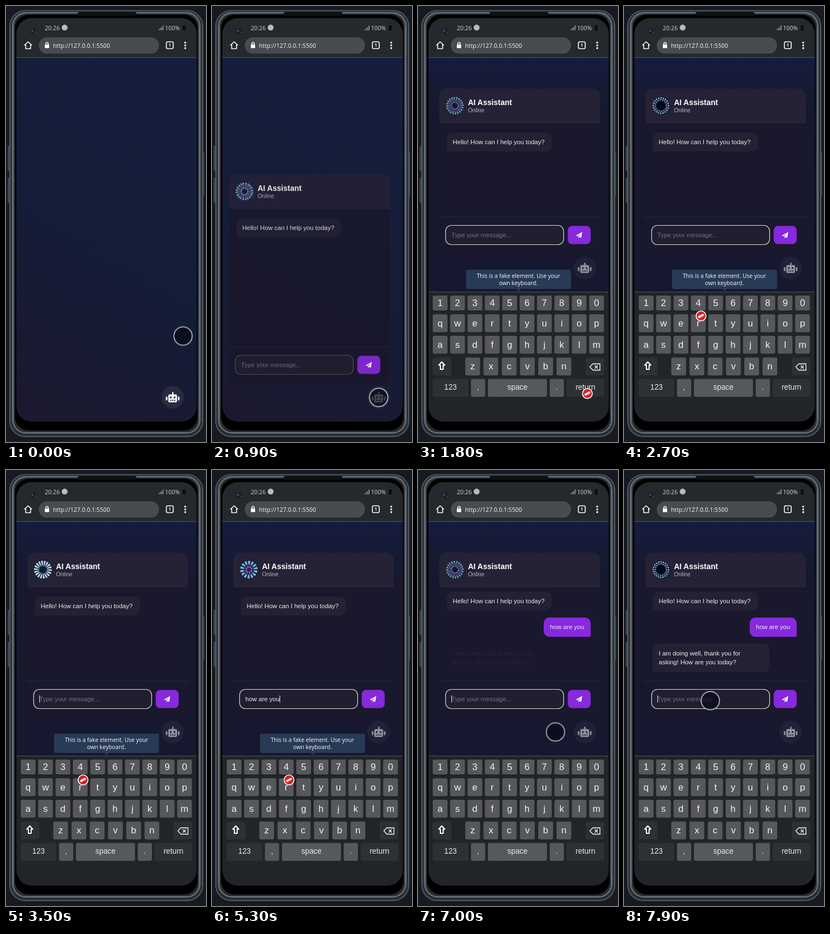
An HTML page for the animation above (8000 ms loop, 366x792 px).

```html
<!DOCTYPE html>
<html lang="en">
<head>
<meta charset="utf-8">
<title>AI Assistant chat</title>
<style>
html, body { margin: 0; width: 100%; height: 100%; overflow: hidden; background: #171a20; }
svg { display: block; width: 366px; height: 792px; }
text { font-family: "Liberation Sans", Arial, sans-serif; font-size: 11.5px; fill: #ececf0; white-space: pre; }
.ui { font-family: "Noto Sans", "Open Sans", sans-serif; font-size: 10.7px; }
.mid { text-anchor: middle; }
.tip-text { font-size: 10.3px; }
.key { font-size: 17px; fill: #f4f4f4; }
.word { font-size: 13.8px; }
.line { fill: none; stroke: #fff; stroke-width: 1.6; }

/* 1% of the loop is 80 ms */
.anim { animation: 8s linear infinite; }
.jump { animation-timing-function: step-end; }

.cursor { animation-name: move; animation-timing-function: ease-in-out; }
@keyframes move {
  0%, 2% { transform: translate(324px, 599.5px); }
  8.5%, 12.4% { transform: translate(305px, 711px); }
  14%, 24% { transform: translate(310px, 704px); }
  31%, 68% { transform: translate(141px, 563px); }
  73%, 76% { transform: translate(297px, 416px); }
  80%, 81.5% { transform: translate(305px, 447px); }
  90% { transform: translate(240px, 482px); }
  97%, 100% { transform: translate(158px, 419px); }
}
.touch { animation-name: touch; }
@keyframes touch {
  0%, 69.5%, 87.5%, 100% { visibility: visible; }
  12.5%, 78% { visibility: hidden; }
}
.forbid { animation-name: forbid; }
@keyframes forbid {
  0%, 69.5%, 100% { visibility: hidden; }
  12.5% { visibility: visible; }
}
.arrow { animation-name: arrow; }
@keyframes arrow {
  0%, 87.5%, 100% { visibility: hidden; }
  78% { visibility: visible; }
}
.keyboard { animation-name: keyboard; }
@keyframes keyboard {
  0% { visibility: hidden; }
  12.5%, 100% { visibility: visible; }
}
.bot { animation-name: bot; }
@keyframes bot {
  0% { transform: none; opacity: 1; }
  12.5%, 100% { transform: translateY(-235px); opacity: .55; }
}
.chat { animation-name: chat; }
@keyframes chat {
  0%, 8.8% { opacity: 0; transform: translate(-8px, 254px); }
  11.5% { opacity: 1; transform: translate(-8px, 234px); }
  12.49% { transform: translate(-8px, 234px); }
  12.5%, 16.4% { transform: translate(-8px, 0); }
  18.5%, 100% { opacity: 1; transform: none; }
}
.top { animation-name: top; }
@keyframes top {
  0%, 16.4% { transform: translateY(-80px); }
  18.5%, 100% { transform: none; }
}
.input { animation-name: focus; }
@keyframes focus {
  0%, 12.5% { stroke: #55535f; }
  20%, 100% { stroke: #dcdce2; }
}
.log { animation-name: log; }
@keyframes log {
  0% { transform: none; }
  87.5%, 100% { transform: translateY(-9px); }
}
.sent { animation-name: sent; }
@keyframes sent {
  0%, 74.3% { opacity: 0; }
  75.5%, 100% { opacity: 1; }
}
.typing { animation-name: typing; }
@keyframes typing {
  0%, 87.5%, 100% { visibility: hidden; }
  76.25% { visibility: visible; }
}
.reply { animation-name: reply; }
@keyframes reply {
  0%, 87.4% { opacity: 0; }
  89%, 100% { opacity: 1; }
}
.tip { animation-name: tip; }
@keyframes tip {
  0%, 15.4% { opacity: 0; }
  17.9%, 80.5% { opacity: 1; }
  84%, 100% { opacity: 0; }
}
</style>
</head>
<body>
<svg viewBox="0 0 366 792">
  <defs>
    <linearGradient id="night" x1=".65" y1="0" x2=".35" y2="1">
      <stop offset="0" stop-color="#171e3d"/>
      <stop offset=".55" stop-color="#151c37"/>
      <stop offset="1" stop-color="#1a1930"/>
    </linearGradient>
    <linearGradient id="dusk" x1="0" y1="0" x2="0" y2="1">
      <stop offset="0" stop-color="#151c3c"/>
      <stop offset=".25" stop-color="#17182f"/>
      <stop offset=".6" stop-color="#18182c"/>
      <stop offset="1" stop-color="#161830"/>
    </linearGradient>
    <pattern id="grille" width="3" height="3" patternUnits="userSpaceOnUse">
      <rect width="3" height="3" fill="#08090a"/>
      <circle cx="1.5" cy="1.5" r=".8" fill="#33373b"/>
    </pattern>
    <clipPath id="screen"><rect x="19" y="22" width="330" height="733" rx="28"/></clipPath>
    <clipPath id="page"><rect x="19" y="94" width="330" height="661"/></clipPath>
  </defs>

  <!-- phone body -->
  <g fill="#3a4651">
    <rect x="3" y="254" width="5" height="46" rx="2"/>
    <rect x="3" y="312" width="5" height="46" rx="2"/>
    <rect x="359" y="265" width="3.5" height="80" rx="1.5"/>
  </g>
  <g fill="none">
    <rect x="7" y="8.5" width="353" height="773.5" rx="28" fill="#15191d" stroke="#4d5c69" stroke-width="2"/>
    <rect x="9.5" y="10.5" width="348" height="769" rx="26" stroke="#2b3238" stroke-width="3"/>
    <rect x="12.5" y="12.500" width="342" height="763" rx="24" stroke="#666c71" stroke-width="3"/>
    <rect x="15" y="14.500" width="337" height="758" rx="24" stroke="#33373a" stroke-width="2"/>
    <rect x="17" y="16.500" width="333" height="754" rx="26" fill="#000" stroke="#050506" stroke-width="2"/>
  </g>
  <rect x="131" y="11" width="108" height="6" rx="3" fill="url(#grille)"/>

  <g clip-path="url(#screen)">
    <rect x="19" y="22" width="330" height="72" fill="#25282c"/>
    <rect x="19" y="94" width="330" height="661" fill="url(#night)"/>

    <!-- status bar -->
    <circle cx="50" cy="46" r="6" fill="#1c2024"/>
    <circle cx="48" cy="45" r="1.6" fill="#3f6f8c"/>
    <circle cx="54" cy="48" r="1.5" fill="#2f4f70"/>
    <text class="ui" x="71" y="44" fill-opacity=".82">20:26</text>
    <circle cx="107.3" cy="39.2" r="5.4" fill="#b9babc"/>
    <path d="M280 44v-2M282.5 44v-4M285 44v-6M287.5 44v-9" stroke="#a5a7aa" stroke-width="1.3"/>
    <text class="ui" x="291" y="44" fill-opacity=".82">100%</text>
    <rect x="323" y="35" width="6" height="9.5" rx="1" fill="#0e0f11"/>

    <!-- address bar -->
    <path class="line" d="M33.5 71.5L40.5 65L47.5 71.5M36 70v7.5h9V70" stroke-linejoin="round"/>
    <rect x="60" y="57" width="220" height="29.5" rx="14.7" fill="#484b4f"/>
    <rect x="71" y="70" width="8" height="6.5" rx="1" fill="#fff"/>
    <path class="line" d="M72.8 70v-1.5a2.2 2.2 0 0 1 4.4 0V70" stroke-width="1.2"/>
    <text class="ui" x="86" y="75.5">http://127.0.0.1:5500</text>
    <rect class="line" x="293.5" y="65" width="12.5" height="12.5" rx="2.5"/>
    <text class="ui mid" x="299.8" y="74.3" style="font-size:8px;font-weight:700">1</text>
    <g fill="#fff"><circle cx="328" cy="66.5" r="1.7"/><circle cx="328" cy="71.5" r="1.7"/><circle cx="328" cy="76.5" r="1.7"/></g>
    <path d="M19 93.5H349" stroke="#56595f"/>

    <g clip-path="url(#page)">
      <rect class="anim jump keyboard" x="19" y="94" width="330" height="426" fill="url(#dusk)"/>

      <g class="anim chat">
        <rect x="39" y="213" width="294" height="235" fill="#19182c"/>
        <g class="anim top">
          <rect x="39" y="213" width="294" height="170" fill="#19182c"/>
          <path d="M39 213V164a14 14 0 0 1 14-14H319a14 14 0 0 1 14 14V213Z" fill="#252236"/>
          <g id="avatar" transform="translate(67.5 181)"></g>
          <text x="91.5" y="180" style="font-size:14px;font-weight:700;fill:#fff">AI Assistant</text>
          <text x="91.5" y="193" style="font-size:10.4px;fill:#b4b3be">Online</text>
          <g class="anim jump log">
            <path d="M63 230H235a10 10 0 0 1 10 10V254a10 10 0 0 1-10 10H56a3 3 0 0 1-3-3V240a10 10 0 0 1 10-10Z" fill="#242133"/>
            <text x="63.5" y="251">Hello! How can I help you today?</text>
            <g class="anim sent">
              <path d="M240 277H306a10 10 0 0 1 10 10V310a2 2 0 0 1-2 2H240a10 10 0 0 1-10-10V287a10 10 0 0 1 10-10Z" fill="#8729dc"/>
              <text x="241.5" y="298">how are you</text>
            </g>
          </g>
          <g class="anim reply">
            <path d="M62 315H256a10 10 0 0 1 10 10V357a10 10 0 0 1-10 10H55a3 3 0 0 1-3-3V325a10 10 0 0 1 10-10Z" fill="#242133"/>
            <text x="63.5" y="337">I am doing well, thank you for</text>
            <text x="63.5" y="353">asking! How are you today?</text>
          </g>
          <g class="anim jump typing">
            <rect x="38" y="351" width="90" height="32" rx="10" fill="#242133"/>
            <text x="47.5" y="371">AI is typing...</text>
          </g>
        </g>
        <path d="M37 383.5H333" stroke="#2d2a3b"/>
        <rect class="anim input" x="50.5" y="398.5" width="216" height="35" rx="10.5" fill="#211e30" stroke-width="1.2"/>
        <text id="field" x="61" y="420"></text>
        <rect id="caret" y="409.5" width="1" height="13" fill="#f0f0f4"/>
        <rect x="274" y="399.5" width="42" height="33" rx="8" fill="#8729dc"/>
        <path d="M300.5 410.5L289 417l3 1.3 6-5.3-4.5 6v3l2-2.2 3.2 1.4Z" fill="#fff"/>
      </g>

      <g class="anim jump bot">
        <circle cx="305" cy="711" r="20.5" fill="#282b3f"/>
        <g fill="#f2f2f6">
          <rect x="304" y="701" width="2.5" height="6" rx="1"/>
          <rect x="297" y="705.5" width="16" height="14.5" rx="2.5"/>
          <rect x="292.5" y="709.5" width="3" height="7" rx="1"/>
          <rect x="314.5" y="709.5" width="3" height="7" rx="1"/>
        </g>
        <g fill="#282b3f">
          <circle cx="301.5" cy="711" r="1.7"/><circle cx="308.5" cy="711" r="1.7"/>
          <path d="M300 715.5h2.5v1.8H300zM303.8 715.5h2.5v1.8h-2.5zM307.5 715.5h2.5v1.8h-2.5z"/>
        </g>
      </g>

      <g class="anim tip">
        <path d="M91 479H277a3 3 0 0 1 3 3V511a3 3 0 0 1-3 3H188l-4 4-4-4H91a3 3 0 0 1-3-3V482a3 3 0 0 1 3-3Z" fill="#293a56"/>
        <text class="ui mid tip-text" x="183.7" y="494">This is a fake element. Use your</text>
        <text class="ui mid tip-text" x="183.7" y="507">own keyboard.</text>
      </g>

      <g class="anim jump keyboard">
        <rect x="19" y="519" width="330" height="236" fill="#212428"/>
        <path d="M19 519.5H349" stroke="#53565c"/>
        <g id="keys"></g>
        <path d="M43.5 646.5L49 652.5H46V660H41V652.5H38Z" fill="none" stroke="#fff" stroke-width="2" stroke-linejoin="round"/>
        <path d="M314.5 655.5L320 650H333V661.5H320ZM323.5 653l5.5 5.5M329 653l-5.5 5.5" fill="none" stroke="#fff" stroke-width="1.3"/>
      </g>
    </g>
  </g>

  <g class="anim cursor">
    <circle class="anim jump touch" r="16.7" fill="#0a0b18" fill-opacity=".75" stroke="#b4b5c0" stroke-width="1.8"/>
    <g class="anim jump forbid">
      <circle r="9" fill="#dc1f27" stroke="#fff" stroke-width="1.6"/>
      <path d="M-4.8 2.6L4.8-2.6" stroke="#fff" stroke-width="3.8"/>
    </g>
    <path class="anim jump arrow" d="M0 0L16.5 14.5 9.5 15.5 13 23 9 25 5.5 17.5 0 22.5Z" fill="#050507" stroke="#f4f4f4" stroke-width="1.5" stroke-linejoin="round"/>
  </g>
</svg>

<script>
const LOOP = 8000;
const byId = id => document.getElementById(id);

// Keyboard
const GREY = '#56585b', DARK = '#2e3033';
const key = (label, x, y, w, h, fill = GREY, type = 'key') =>
  `<rect x="${x}" y="${y}" width="${w}" height="${h}" rx="3" fill="${fill}"/>` +
  `<text class="mid ${type}" x="${x + w / 2}" y="${Math.floor(y + h / 2 + (type === 'key' ? 6 : 4))}">${label}</text>`;
const row = (labels, x, pitch, y, h) =>
  [...labels].map((c, i) => key(c, x + i * pitch, y, 27, h)).join('');

byId('keys').innerHTML =
  row('1234567890', 27, 31.8, 526, 27) +
  row('qwertyuiop', 27, 31.8, 560, 32.5) +
  row('asdfghjklm', 27, 31.8, 599, 32.5) +
  row('zxcvbn', 86.5, 33.4, 638.5, 32.5) +
  key('', 27, 638.5, 34, 32.5, DARK) +
  key('', 307, 638.5, 34, 32.5, DARK) +
  key('123', 27, 677.5, 65, 32.5, DARK, 'word') +
  key(',', 97, 677.5, 26, 32.5, GREY, 'word') +
  key('space', 128, 677.5, 108, 32.5, GREY, 'word') +
  key('.', 241, 677.5, 26, 32.5, GREY, 'word') +
  key('return', 272, 677.5, 69, 32.5, DARK, 'word');

// Avatar: four ring patterns that fade into one another
const ring = (r, w, color, n) =>
  `<circle r="${r}" fill="none" stroke="${color}" stroke-width="${w}"` +
  (n ? ` pathLength="${n}" stroke-dasharray=".62 .38"/>` : '/>');
const core = (r, color) => `<circle r="${r}" fill="${color}"/>`;
const CYCLE = 5200, CYCLE_START = 2700;
const looks = [
  { at: 0, art: ring(14, 2.6, '#86a9c8', 20) + ring(10.5, 2.6, '#5b86b4', 16) + core(8, '#05070f') },
  { at: 800, art: ring(12, 8.5, '#c3d9ea', 18) + ring(8, 3, '#5a84ab', 18) + core(5, '#10182c') },
  { at: 2600, art: ring(12.5, 7, '#7db2da', 14) + ring(8, 3, '#1c3b68') + ring(5, 3, '#c06abf', 8) + core(2, '#2a2c62') },
  { at: 3750, art: ring(14.3, 3.6, '#93c4e0', 20) + ring(10.5, 3.6, '#8a5cb8', 22) + ring(6.5, 3, '#b3d3ec', 14) + core(4, '#1d1740') }
];
byId('avatar').innerHTML = core(16.5, '#111a2e') + looks.map(l => `<g>${l.art}</g>`).join('');
const layers = byId('avatar').querySelectorAll('g');

function drawAvatar(t) {
  const p = (t - CYCLE_START + CYCLE) % CYCLE;
  looks.forEach((look, i) => {
    const next = looks[i + 1] ? looks[i + 1].at : CYCLE;
    const prev = i ? looks[i - 1].at : looks[looks.length - 1].at - CYCLE;
    let d = p - look.at;
    if (i === 0 && d > CYCLE / 2) d -= CYCLE;
    const span = d < 0 ? look.at - prev : next - look.at;
    layers[i].setAttribute('opacity', Math.max(0, 1 - Math.abs(d) / span));
    layers[i].setAttribute('transform', `rotate(${t * 0.045})`);
  });
}

// Message field
const MESSAGE = 'how are you', HINT = 'Type your message...';
const TYPE_START = 4200, KEY_TIME = 100, SEND = 5950, REFOCUS = 7700;
const field = byId('field'), caret = byId('caret');

function drawField(t) {
  const count = t < TYPE_START || t >= SEND ? 0
    : Math.min(MESSAGE.length, Math.floor((t - TYPE_START) / KEY_TIME) + 1);
  const typed = MESSAGE.slice(0, count);
  field.textContent = typed || HINT;
  field.style.fill = typed ? '#ececf0' : '#74727f';
  caret.setAttribute('x', 61 + (typed ? field.getComputedTextLength() : 0));
  const blinkFrom = count ? TYPE_START + (count - 1) * KEY_TIME
    : t >= REFOCUS ? REFOCUS : t >= SEND ? SEND : 100;
  caret.setAttribute('opacity', t >= blinkFrom && (t - blinkFrom) % 1000 < 500 ? 1 : 0);
}

const start = performance.now();
function draw() {
  const t = Math.max(0, performance.now() - start) % LOOP;
  drawAvatar(t);
  drawField(t);
  requestAnimationFrame(draw);
}
draw();
</script>
</body>
</html>
```
